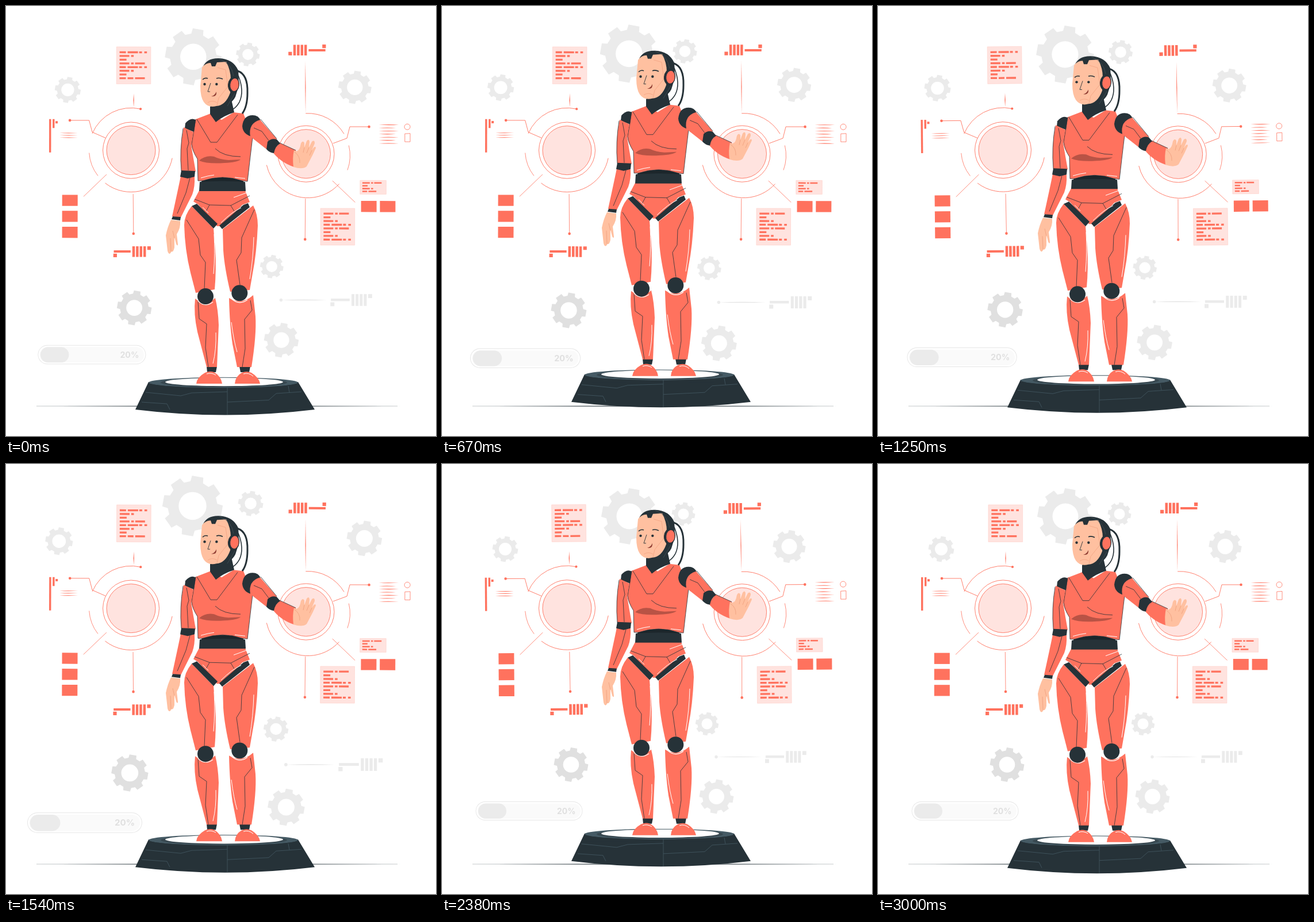
An HTML page with a canvas that plays this animation: 748x748 px, repeating every 3040 ms.

```html
<!DOCTYPE html>
<html lang="en">
<head>
<meta charset="utf-8">
<title>Robot on a platform</title>
<style>
html, body { margin: 0; width: 100%; height: 100%; overflow: hidden; background: #fff; }
canvas { display: block; width: 748px; height: 748px; }
</style>
</head>
<body>
<canvas id="stage"></canvas>
<script>
const SIZE = 748, LOOP = 3040, STEP = 1000 / 24, LEAD = 33;
const RED = '#ff725e', PALE = '#ffe3df', DARK = '#263238', SKIN = '#ffc0a0';
const GREY = '#ebebeb', MID = '#e0e0e0', SEAM = '#455a64', WHITE = '#fff';

const canvas = document.getElementById('stage');
const ctx = canvas.getContext('2d');
const dpr = window.devicePixelRatio || 1;
canvas.width = canvas.height = Math.round(SIZE * dpr);

function fill(color, d) {
  ctx.fillStyle = color;
  ctx.fill(new Path2D(d));
}
function line(color, width, d) {
  ctx.strokeStyle = color;
  ctx.lineWidth = width;
  ctx.stroke(new Path2D(d));
}
function box(color, x, y, w, h) {
  ctx.fillStyle = color;
  ctx.fillRect(x, y, w, h);
}
function oval(color, x, y, rx, ry = rx, turn = 0) {
  ctx.fillStyle = color;
  ctx.beginPath();
  ctx.ellipse(x, y, rx, ry, turn, 0, 7);
  ctx.fill();
}
function arc(color, width, x, y, r, from = 0, to = 360) {
  ctx.strokeStyle = color;
  ctx.lineWidth = width;
  ctx.beginPath();
  ctx.arc(x, y, r, from * Math.PI / 180, to * Math.PI / 180);
  ctx.stroke();
}
function pill(color, x, y, w, h) {
  ctx.beginPath();
  ctx.roundRect(x, y, w, h, h / 2);
  ctx.fillStyle = color;
  ctx.fill();
}
// A stroke that thins out towards both ends.
function taper(color, x1, y1, x2, y2, width) {
  const len = Math.hypot(x2 - x1, y2 - y1);
  const nx = (y1 - y2) / len * width, ny = (x2 - x1) / len * width;
  const mx = (x1 + x2) / 2, my = (y1 + y2) / 2;
  fill(color, `M${x1} ${y1}Q${mx + nx} ${my + ny} ${x2} ${y2}Q${mx - nx} ${my - ny} ${x1} ${y1}Z`);
}

function gear(color, x, y, r, hole) {
  const teeth = 8, turn = 10 * Math.PI / 180;
  ctx.beginPath();
  for (let i = 0; i < teeth; i++) {
    const a = turn + i * 2 * Math.PI / teeth;
    for (const [da, k] of [[-0.26, 0.82], [-0.19, 1], [0.19, 1], [0.26, 0.82]])
      ctx.lineTo(x + Math.cos(a + da) * r * k, y + Math.sin(a + da) * r * k);
  }
  ctx.closePath();
  ctx.moveTo(x + hole, y);
  ctx.arc(x, y, hole, 0, 2 * Math.PI, true);
  ctx.fillStyle = color;
  ctx.fill();
}

// A dash, four bars and two small squares; a negative scale turns it round.
function gauge(color, x, y, s) {
  ctx.save();
  ctx.translate(x, y);
  ctx.scale(s, s);
  box(color, 0.8, 7, 29.3, 4);
  box(color, 0, 12.8, 6.2, 6.2);
  for (let i = 0; i < 4; i++) box(color, 33 + i * 6.4, 0, 4.5, 18.5);
  box(color, 59, 0, 6.2, 6.2);
  ctx.restore();
}

// Each row of code: start and width of its words.
const ROWS = {
  a: [0, 11, 14, 18, 34, 5, 43, 4.6],
  b: [0, 17, 20, 4.6],
  c: [0, 12],
  d: [0, 17, 20, 4.6, 27, 17],
  e: [0, 11, 14, 10, 27, 17],
  f: [0, 11, 14, 18]
};
function code(x, y, w, h, rows, s, top) {
  box(PALE, x, y, w, h);
  ctx.strokeStyle = '#ffcfc8';
  ctx.lineWidth = 0.6;
  ctx.strokeRect(x, y, w, h);
  [...rows].forEach((key, i) => {
    const row = ROWS[key];
    for (let j = 0; j < row.length; j += 2)
      box(RED, x + (5.3 + row[j]) * s, y + top + i * 6.45 * s, row[j + 1] * s, 3.3 * s);
  });
}

function meter() {
  pill('#e6e6e6', 58.5, 587, 186, 33);
  pill(WHITE, 59.4, 587.9, 184.2, 31.2);
  pill('#fafafa', 62, 590.5, 179, 26.5);
  pill(GREY, 63, 590.5, 49, 26.5);
  ctx.fillStyle = MID;
  ctx.font = '700 14px Inter, "Open Sans", sans-serif';
  ctx.textAlign = 'right';
  ctx.fillText('20%', 232.5, 608.6);
}

function backdrop() {
  gear(GREY, 326, 91, 49, 22.5);
  gear(GREY, 420, 87, 20.5, 9.5);
  gear(GREY, 110, 148, 22.5, 11);
  gear(GREY, 604, 143.5, 28.7, 13.5);
  gear(GREY, 461, 452, 20.3, 9.5);
  gear(MID, 224.5, 523, 30, 13.8);
  gear(GREY, 477.5, 578.5, 30, 13.5);
  oval(GREY, 477, 509.5, 2.7);
  taper(MID, 477, 509.5, 556, 509.5, 1.2);
  gauge(GREY, 562, 499.3, 1.1);
  meter();
}

function dial(x, y) {
  oval(PALE, x, y, 42.5);
  arc(RED, 0.9, x, y, 42.5);
  arc(RED, 0.9, x, y, 49);
}

function leftPanel() {
  code(192, 71, 59.6, 64.5, 'abcdabce', 1, 7.8);
  taper(RED, 222, 152, 222, 176, 1.4);
  oval(RED, 234, 179, 2.1);
  dial(217.5, 251);
  arc(RED, 0.9, 217.5, 250.5, 73.3, 203, 283);
  arc(RED, 0.8, 217.5, 250.5, 73, 142, 176);
  arc(RED, 0.9, 217.5, 250.5, 73, 11, 128);

  oval(RED, 111, 199, 2.3);
  line(RED, 0.9, 'M111 199H144.5L150 219.5L173 229.5');
  box(RED, 75, 197, 3.4, 58);
  box(RED, 81, 197, 3.4, 15.5);
  box(RED, 86, 200.3, 4, 4);
  for (let i = 0; i < 3; i++) taper(RED, 93, 221 + i * 4, 125, 221 + i * 4, 1);

  line(RED, 0.8, 'M175 293L135 331.5');
  line(RED, 0.8, 'M221.3 327L222 396');
  oval(RED, 222, 396, 2.3);
  for (let i = 0; i < 3; i++) box(RED, 97.8, 328.6 + i * 27.8, 27, 19.3);
  gauge(RED, 187, 418, 1);
}

function rightPanel() {
  gauge(RED, 556.2, 86, -1);
  taper(RED, 520.5, 96, 521, 187, 1.2);
  dial(522, 257.3);
  arc(RED, 0.9, 525, 260.3, 73.5, 267, 329);
  arc(RED, 0.8, 525, 260.3, 73.5, 346, 380);
  arc(RED, 0.9, 525, 260.3, 73.5, 42, 167);

  oval(RED, 631.5, 210, 2.3);
  line(RED, 0.9, 'M631 210H598L593 230L569 239');
  for (let i = 0; i < 7; i++) {
    const y = 206.5 + i * 5.4;
    taper(RED, 648.5, y, i % 2 ? 678 : 683, y, 1.1);
  }
  arc(RED, 0.8, 698, 210, 5);
  line(RED, 0.8, 'M693.8 222L703 221.5V236H693.8Z');

  line(RED, 0.8, 'M568 304L607.5 341.5');
  line(RED, 0.8, 'M521 335L520.5 406');
  oval(RED, 520.5, 406, 2.3);
  code(616, 303.3, 45.5, 24, 'dcbf', 0.76, 3.2);
  box(RED, 617.8, 339, 27, 19.3);
  box(RED, 650.6, 339, 27, 19.3);
  code(547.3, 352, 59.6, 64, 'dcbadcba', 1, 7.5);
}

function ground() {
  taper('#c4c8ca', 41, 696, 694, 696, 1.4);
  box('#b9bec0', 53, 695.6, 628, 0.8);
  taper(DARK, 93, 696, 660, 696, 1);
}

function platform() {
  fill(DARK, 'M248 654L225 702Q381 721 537 702L508 654Z');
  oval(SEAM, 378, 655, 130, 9.2);
  fill(DARK, 'M248 655.5Q260 663 378 664.5Q498 663 508 655.5L510 668H246Z');
  oval('#37474f', 379, 655, 110, 8);
  oval(WHITE, 379.5, 654, 102.5, 7.2);
  line(SEAM, 0.8, 'M385 664V711M243 672L304 678L323 673L385 671M236 689L280 692L285 702');
  line(SEAM, 0.8, 'M385 689L457 685.5L470 674L514 671M491 661L493 672');
}

function legs() {
  fill(DARK, 'M349 627H367L365 637H350ZM406 627H425L423 637H408Z');
  fill(RED, 'M331 657Q332 646 346 638Q354 634 362 637Q374 644 376 657Z');
  fill(RED, 'M398 657Q399 644 410 638Q418 634 427 638Q440 646 442 657Z');
  line(WHITE, 1, 'M349 640Q357 637 365 642M413 640Q422 637 430 644');

  // thighs
  fill(RED, 'M323 348Q310 364 310 381Q311 424 321 464L330 499L363 493Q366 460 364 424L361 387Z');
  fill(RED, 'M430 347Q438 362 438 382Q436 430 429 465L424 494L390 497Q380 455 378 425L377 388Z');
  line(DARK, 0.8, 'M314 372L335 405L338 433L347 446L345 492');
  line(DARK, 0.8, 'M432 354L410 403L409 429L401 442L407 485');
  line(WHITE, 1, 'M362 397Q364 430 361 466M431 402Q430 440 424 475');

  // shins
  fill(RED, 'M329 509Q326 535 333 567L349 628H367L370 555Q369 528 364 508Q346 523 329 509Z');
  fill(RED, 'M388 508Q389 555 394 588L402 628H427Q436 572 434 540L430 503Q410 521 388 508Z');
  line(DARK, 0.8, 'M334 514L336 544L349 553L347 594L352 628');
  line(DARK, 0.8, 'M425 512L428 529L415 545L416 596L411 628');
  line(WHITE, 1, 'M365 568Q366 598 360 622M392 550Q396 582 402 602');
  line(WHITE, 1.2, 'M334 513Q346 525 360 515M393 510Q406 521 420 511');
  oval(DARK, 347, 505, 14);
  oval(DARK, 406.3, 499.3, 14);
}

function hips() {
  fill(RED, 'M336 321H416L424 341L411 346L377 383H367L334 345L326 340Z');
  fill(DARK, 'M323 348L332 344L368 379L361 387Z');
  fill(DARK, 'M413 346L421 343L424 350L376 388L371 382Z');
  fill('#1c262b', 'M341 304Q377 292 412 304L416 309H337Z');
  fill(DARK, 'M337 306Q377 303 416 306L417 322H336Z');
  line(DARK, 0.8, 'M328 336L354 346L391 347L424 330M354 346L348 357M391 347L397 357');
  line(WHITE, 1, 'M396 333L418 325M374 377Q393 358 409 351M342 350L352 360');
}

function torso() {
  fill(RED, 'M330 197L356 187L375 198L396 185L413 187L429 228L424 270L420 305L411 304Q377 292 342 304L334 304L333 266Q323 250 322 239Z');
  line(DARK, 0.8, 'M330 197L323 240Q324 252 333 266L334 304H342Q377 292 411 304L420 305L424 270L429 228');
  fill('#b95345', 'M336 269Q347 259 362 262Q372 267 387 268L408 267Q402 272 380 273Q350 275 336 269Z');
  line(DARK, 0.8, 'M332 197L356 237H367L403 189M364 248Q378 262 408 262');
  line(WHITE, 1, 'M339 299Q352 295 362 294M398 298L416 300');
}

function leftArm() {
  fill(DARK, 'M312 204Q321 193 330 198L327 219L311 213Z');
  fill(RED, 'M309 211L326 219L322 242L330 288L305 287Q301 249 309 211Z');
  line(DARK, 0.8, 'M308 213Q302 250 305 287M314 216L318 238L315 248L317 286');
  fill(RED, 'M304 296L328 297Q329 314 324 328L304 368L289 366Q298 325 304 296Z');
  line(DARK, 0.8, 'M320 299L313 325L298 361');
  fill(DARK, 'M305 286L329 287L328 297L316 300L303 297Z');
  fill(DARK, 'M290 366L304 367L303 373L288 371Z');
  fill(SKIN, 'M287 372L303 374Q304 386 297 397L299 414Q299 419 296 414L293 402L293 420Q291 429 288 427L286 430Q283 433 281 426L278 399Q281 384 287 372Z');
  line('#eb9a78', 0.7, 'M287 427L286 404M293 404L290 391');
}

function rightArm() {
  fill(DARK, 'M411 209Q413 190 429 190Q439 190 443 199L430 228Q412 224 411 209Z');
  fill(RED, 'M442 198L471 231L453 249L425 227Q421 204 442 198Z');
  line(DARK, 0.8, 'M443 197L471 231M431 212L445 218L457 234');
  fill(RED, 'M476 238L504 251L501 280Q477 272 463 253Z');
  line(DARK, 0.8, 'M476 238L504 251');
  fill(DARK, 'M455 236Q462 229 471 232L477 239Q468 244 466 256Q458 255 453 249Z');
  fill(SKIN, 'M501 251Q510 257 513 239Q516 233 519 238L519 246L523 235Q527 230 528 236L527 246L532 236Q537 232 537 239L532 251Q538 241 539 247L533 260L523 279Q516 285 500 280Q498 264 501 251Z');
  line('#eb9a78', 0.7, 'M519 246L517 255M527 246L523 256M532 251L528 260M502 254Q512 261 511 273');
}

function head() {
  line(DARK, 3, 'M403 113Q421 119 420 151Q420 175 411 187');
  line(DARK, 1.6, 'M404 121Q415 148 406 167Q401 176 394 180');
  fill(DARK, 'M355 175L391 158L397 185Q378 191 365 202L355 188Z');
  fill(DARK, 'M343 105Q350 90 371 91Q395 92 404 112Q407 137 399 158Q391 174 366 176L350 110Z');
  fill(SKIN, 'M341 107Q347 99 356 99L358 105H364L367 98L383 97Q391 112 391 128L390 151Q382 173 366 174Q352 178 344 167Q338 158 338 139Z');
  line('#f0a07e', 0.7, 'M368 107L382 111L386 140L370 160L367 173M351 168Q359 163 367 168');
  line(DARK, 1.6, 'M342 128Q346 124 351 126M366 126Q371 124 377 127');
  oval(DARK, 345.5, 136, 2.2);
  oval(DARK, 366.3, 136, 2.2);
  line(DARK, 0.9, 'M356 134L351 149L355 149');
  fill('#8f3d33', 'M357 157Q363 156 366 149Q367 159 357 157Z');
  oval(DARK, 396, 137, 10, 14, 0.1);
  oval(RED, 397.5, 137, 7.3, 11, 0.1);
  line('#46545a', 0.7, 'M371 92Q393 100 396 122M398 152L385 174');
}

function robot() {
  platform();
  legs();
  hips();
  torso();
  leftArm();
  head();
  rightArm();
}

// Draws with a turn and a zoom about the point x, y.
function around(x, y, angle, zoom, draw) {
  ctx.save();
  ctx.translate(x, y);
  ctx.rotate(angle);
  ctx.scale(zoom, zoom);
  ctx.translate(-x, -y);
  draw();
  ctx.restore();
}

// Two beats: quick rise and slow fall, then an even one, then rest.
function beat(u) {
  const keys = [[0, 0], [0.1, 1], [0.3, 0], [0.4, 0], [0.5, 1], [0.6, 0], [1, 0]];
  for (let i = 1; i < keys.length; i++) {
    const [a, p] = keys[i - 1], [b, q] = keys[i];
    if (u <= b) return p + (q - p) * (u - a) / (b - a);
  }
  return 0;
}

function render(ms) {
  const time = Math.min(Math.floor((ms % LOOP + 5) / STEP) * STEP + LEAD, 3000);
  const u = time % 1500 / 1500;
  const lift = 15 * (1 - Math.abs(1 - 2 * u));
  const sway = Math.asin(Math.sin(2 * Math.PI * u)) / 90;

  ctx.setTransform(dpr, 0, 0, dpr, 0, 0);
  box(WHITE, 0, 0, SIZE, SIZE);
  ctx.lineJoin = 'round';

  around(346, 331, 0, 1 + 0.1 * beat(time / 3000), backdrop);
  ground();
  around(182, 254, sway, 1, leftPanel);
  around(578, 241, sway, 1, rightPanel);

  ctx.save();
  ctx.translate(0, 0.7 - lift);
  robot();
  ctx.restore();
}

const start = performance.now();
function tick() {
  render(performance.now() - start);
  requestAnimationFrame(tick);
}
tick();
</script>
</body>
</html>
```
